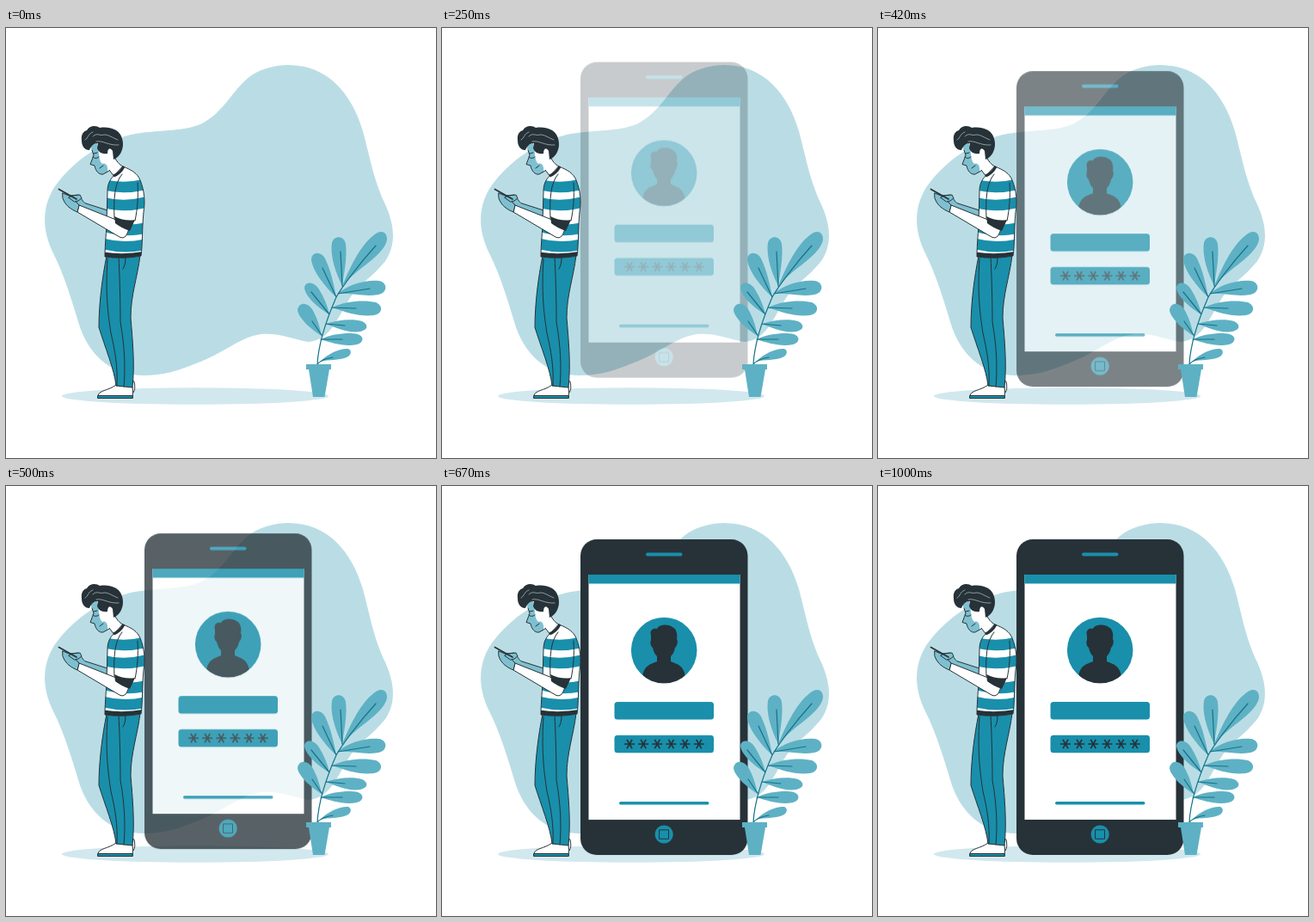
An HTML page that plays this animation: 500 px wide and 500 px high, repeating every 1.04 s.

```html
<!DOCTYPE html>
<html lang="en">
<head>
<meta charset="utf-8">
<title>Phone sign-in</title>
<style>
  :root { --teal: #198fab; --dark: #263238; --leaf: #5eb1c4; --vein: #147389; --skin: #7fc0d0; }
  html, body { margin: 0; width: 100%; height: 100%; overflow: hidden; background: #fff; }
  svg { display: block; width: 100vw; height: 100vh; }
  .teal { fill: var(--teal); }
  .dark { fill: var(--dark); }
  .leaf { fill: var(--leaf); }
  .white { fill: #fff; }
  .skin { fill: var(--skin); }
  .line { stroke: var(--dark); stroke-width: 1; stroke-linejoin: round; stroke-linecap: round; }
  .bare { fill: none; }
  .vein { fill: none; stroke: var(--vein); stroke-width: 1.2; stroke-linecap: round; }
  .stripes { fill: none; stroke: var(--teal); stroke-width: 12.5; }
  .shine { fill: none; stroke: #b9c8cc; stroke-width: .7; stroke-linecap: round; }
  .star { fill: none; stroke: var(--dark); stroke-width: 1.7; }

  /* Playback position is set by the script, on a 24 fps beat. */
  #phone { animation: drop 1s cubic-bezier(.36, -.01, .5, 1.38) both paused; }
  @keyframes drop {
    from { opacity: 0; transform: translateY(-30px); }
    to { opacity: 1; transform: translateY(0); }
  }
</style>
</head>
<body>
<svg viewBox="0 0 500 500">
  <defs>
    <clipPath id="disc"><circle cx="258.200" cy="191" r="38.300"/></clipPath>
    <path id="shirt" d="M136 161C146 165 153 169 156 177C161 189 162 202 160 214C158 236 159 250 157 265Q136 269 115 266C115 250 117 236 117 225L118 190C118 181 121 176 126 171Z"/>
    <clipPath id="shirtClip"><use href="#shirt"/></clipPath>
    <path id="star" d="M-6 0H6M-3-5.200L3 5.200M3-5.200L-3 5.200"/>
  </defs>

  <path fill="#badde5" d="M328 43C374 43 402 76 415 120C424 154 428 178 441 205C452 230 454 252 441 271C425 291 412 296 400 314C386 335 378 363 352 365C334 362 318 354 296 356C271 360 254 378 221 390C199 399 182 404 160 404C127 404 99 385 86 348C76 315 68 288 55 262C41 233 42 207 57 184C79 154 113 130 150 123C180 118 203 121 226 112C255 98 264 69 287 54C299 47 313 43 328 43Z"/>
  <ellipse cx="220" cy="428" rx="155" ry="9.800" fill="#d1e8ee"/>

  <g id="phone">
    <rect class="dark" x="161" y="62" width="194.500" height="367" rx="19"/>
    <rect class="teal" x="237" y="77.500" width="42.500" height="4" rx="2"/>
    <rect class="white" x="170.500" y="103" width="176" height="285"/>
    <rect class="teal" x="170.500" y="103" width="176" height="10.500"/>
    <circle class="teal" cx="258.200" cy="191" r="38.300"/>
    <path class="dark" clip-path="url(#disc)" d="M243 174C241 167 246 165 250 166C253 160 265 161 268 164C273 166 274 173 273 178C275 180 273 187 271 188C270 193 268 196 266 198V204C275 208 283 208 284 230H232C233 208 241 208 250 204V198C247 195 246 192 245 188C242 186 242 181 243 179Z"/>
    <rect class="teal" x="200.500" y="251" width="115.500" height="20.500" rx="3.500"/>
    <rect class="teal" x="200.500" y="289.700" width="115.500" height="20.500" rx="3.500"/>
    <g id="stars" class="star"></g>
    <rect class="teal" x="206" y="367" width="104.500" height="3.600" rx="1.800"/>
    <circle class="teal" cx="258.200" cy="405" r="10.600"/>
    <rect class="line bare" x="253" y="399.800" width="10.500" height="10.500"/>
  </g>

  <g id="man">
    <!-- far arm and hand -->
    <path class="skin line" d="M118 212L93 204C89 203 88 197 84 194L74 195L82 203L88 209L118 223Z"/>
    <!-- shoes -->
    <path class="white line" d="M142 426L148 424Q151 420 149 411L143 409Z"/>
    <path class="white line" d="M107 428C107 421 119 422 128 415L147 417Q148 423 147 430H107Z"/>
    <path class="teal line" d="M107 427.500H147.300V430.500H107Z"/>
    <!-- trousers -->
    <path class="teal line" d="M117 265L156 264C153 290 145 310 145 337C147 362 150 390 147 418L128 416C126 397 115 371 108 348C108 320 112 290 117 265Z"/>
    <path class="line bare" d="M118 268C115 315 120 340 122 355C127 376 130 394 129 416M131 266C132 285 133 315 133 342C138 370 139 395 137 417M139 267Q139 276 136 280"/>
    <!-- neck and face -->
    <path class="white line" d="M126 149C128 155 132 159 136 161L126 173L120 165Z"/>
    <path class="white" d="M99 137L102 148L98 158.500L103 160C104 166 108 171 113 170C118 169 122 164 126 155L124 140L106 134Z"/>
    <path class="skin" d="M98 137L102 148L98 158.500L103 160C104 166 108 171 113 170L118 168C119 162 117 156 112 158C107 154 109 145 106 134Z"/>
    <path class="line bare" d="M100 142L102 148L98 158.500L103 160C104 166 108 171 113 170L120 166M101 150Q104 153 108 150M102 146L106 145M109 163L113 160"/>
    <!-- hair -->
    <path class="dark" d="M97 142C91 142 88 137 88 131C87 124 90 120 94 119C97 113 105 113 109 116C116 115 122 116 126 118C132 120 136 127 136 135C136 143 132 149 127 152L125 153L124 143C121 138 118 140 118 146C112 147 108 145 106 140L107 134C102 134 99 137 97 142Z"/>
    <path class="shine" d="M92 130C96 128 95 123 101 121M101 126C106 121 109 126 114 124C120 124 124 128 130 130M105 132C112 130 119 137 131 136"/>
    <!-- shirt -->
    <use href="#shirt" class="white"/>
    <g clip-path="url(#shirtClip)">
      <path class="stripes" d="M110 181Q136 189 165 181M110 202Q136 210 165 202M110 229Q136 239 165 232M110 250Q136 258 165 251"/>
      <path class="dark" d="M110 260Q136 265 165 259V270H110Z"/>
    </g>
    <use href="#shirt" class="line bare"/>
    <path class="bare" stroke="var(--dark)" stroke-width="3" d="M137 161Q133 169 125 172"/>
    <path class="line bare" d="M135 170C126 180 125 200 126 221M153 180C154 196 153 210 150 224"/>
    <!-- near arm, hand and handset -->
    <path class="white line" d="M143 233C141 241 138 246 132 243L83 214L85 206L128 223Z"/>
    <path class="dark" d="M126 219Q138 225 150 223L144 236Q133 232 127 227Z"/>
    <path class="skin line" d="M66 192L76 196L85 206L83 214C76 211 69 207 66 198Z"/>
    <path class="skin line" d="M73 197L77 195L86 194L88 198L84 201L80 202Z"/>
    <path class="bare" stroke="var(--dark)" stroke-width="1.700" stroke-linecap="round" d="M61.500 187.500L82 199"/>
  </g>

  <g id="plant">
    <path class="leaf" d="M391 300C400 278 414 248 432 238C441 234 446 243 441 252C433 268 409 279 391 300
      M391 300C381 280 377 262 379 250C381 241 393 241 395 251C397 268 393 284 391 300
      M384 313C370 300 357 283 355 270C355 260 366 259 371 268C378 283 381 297 384 313
      M376 333C362 325 348 312 347 302C348 294 359 295 364 304C370 314 374 323 376 333
      M367 358C354 350 340 337 339 328C340 319 350 318 356 327C362 337 365 348 367 358"/>
    <path class="leaf" d="M385 309C397 299 418 292 434 294C444 296 444 308 433 310C418 313 402 308 385 309
      M379 325C395 317 418 316 430 319C439 323 438 332 428 334C412 336 396 331 379 325
      M372 344C386 339 404 338 414 341C422 345 421 351 412 353C398 355 384 349 372 344
      M366 362C380 355 400 354 409 356C417 359 416 366 408 368C394 371 378 366 366 362
      M365 388C376 377 390 372 398 373C403 375 401 381 396 383C386 387 376 385 365 388"/>
    <path class="vein" d="M362 391C363 372 370 345 384 313C390 302 410 275 430 253
      M391 300L389 260M384 313L368 279M376 333L355 307M367 357L356 341
      M386 309L423 303M379 325L407 326M372 344L394 346M366 362L391 362M362 391Q367 385 380 383"/>
    <path class="leaf" d="M349 391H378V397H376L370.500 429H357L352 397H349Z"/>
  </g>
</svg>
<script>
  const LOOP = 1040, FPS = 24, LEAD = 15;
  const phone = document.getElementById('phone');

  document.getElementById('stars').innerHTML = Array.from({ length: 6 }, (_, i) =>
    `<use href="#star" transform="translate(${218 + i * 16.15} 300)"/>`).join('');

  const drop = phone.getAnimations()[0];
  const start = performance.now();

  function draw() {
    const t = (performance.now() - start) % LOOP;
    // Beats fall on times rounded to 10 ms, hence the half-step lead.
    const beat = Math.min(FPS, Math.floor((t + 5) * FPS / 1000));
    drop.currentTime = beat && beat * 1000 / FPS + LEAD;
    requestAnimationFrame(draw);
  }
  draw();
</script>
</body>
</html>
```
